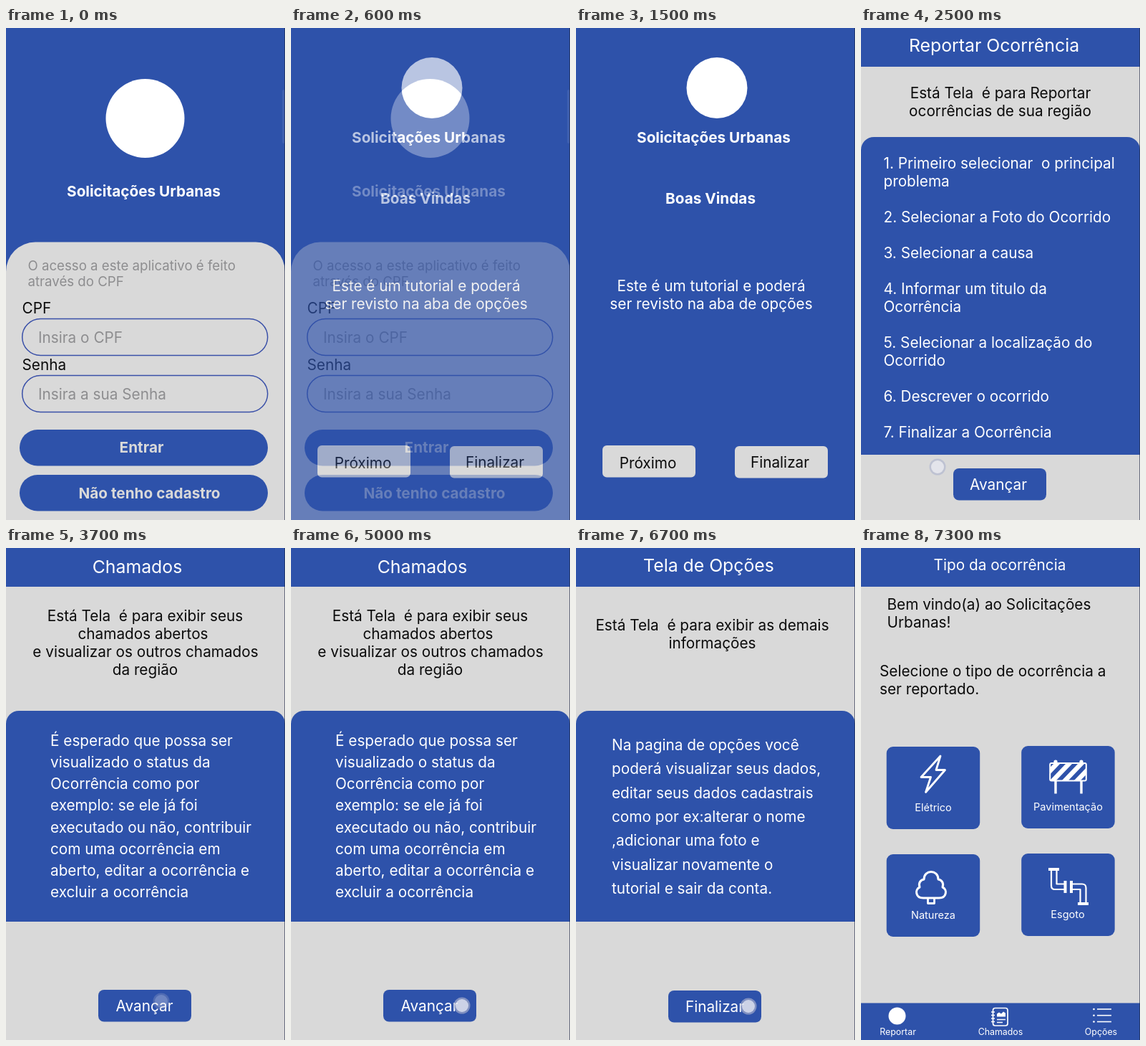
Recreate the animation shown at these times as an HTML page. Size 390 by 686 pixels, loop 8000 ms.

```html
<!DOCTYPE html>
<html lang="pt">
<head>
<meta charset="utf-8">
<title>Tutorial</title>
<style>
html, body { margin: 0; width: 100%; height: 100%; overflow: hidden; background: #2e52aa; }
svg { display: block; width: 100%; height: 100%; }
text { font-family: Inter, Roboto, sans-serif; white-space: pre; }
</style>
</head>
<body>
<svg id="stage" viewBox="0 0 390 686"></svg>
<script>
const BLUE = '#2e52aa', GREY = '#d9d9d9', WHITE = '#fff', INK = '#0b0b0b';
const HINT = '#8d8d8f';
const BODY = 20.75, HEAD = 24.8, NOTE = 18.65, LABEL = 14.5, TAB = 12.4;
const LOOP = 8000, STEP = 100;
const APP = 'Solicitações Urbanas';

// Shape and text helpers
const rect = (x, y, w, h, r, fill, extra = '') =>
  `<rect x="${x}" y="${y}" width="${w}" height="${h}" rx="${r}" fill="${fill}" ${extra}/>`;
const text = (x, y, s, fill, size = BODY, extra = '') =>
  `<text x="${x}" y="${y}" fill="${fill}" font-size="${size}" ${extra}>${s}</text>`;
const mid = (x, y, s, fill, size = BODY, weight = 400) =>
  text(x, y, s, fill, size, `text-anchor="middle" font-weight="${weight}"`);
const bold = (x, y, s, fill) => mid(x, y, s, fill, BODY, 700);
const lines = (x, y, gap, list, fill) =>
  list.map((s, i) => text(x, y + i * gap, s, fill)).join('');
const circle = (x, y, r, fill = WHITE) => `<circle cx="${x}" cy="${y}" r="${r}" fill="${fill}"/>`;
const line = (d, w) =>
  `<path d="${d}" fill="none" stroke="#fff" stroke-width="${w}" stroke-linejoin="round"/>`;

// Sheet with rounded top corners
const sheet = (top, bottom, r, fill) =>
  `<path d="M0 ${bottom}V${top + r}A${r} ${r} 0 0 1 ${r} ${top}H${390 - r}A${r} ${r} 0 0 1 390 ${top + r}V${bottom}Z" fill="${fill}"/>`;

const field = (y, label, hint) =>
  text(22.5, y - 7.5, label, INK) +
  rect(22.7, y, 343, 51, 25.5, 'none', 'stroke="#3a50a8" stroke-width="1.5"') +
  text(45, y + 33, hint, HINT);

const login = rect(0, 0, 390, 686, 0, BLUE) +
  circle(194.5, 126, 55) +
  bold(192.5, 235, APP, WHITE) +
  sheet(298.6, 686, 41, GREY) +
  text(30.5, 337.5, 'O acesso a este aplicativo é feito', HINT, NOTE) +
  text(30.5, 360, 'através do CPF', HINT, NOTE) +
  field(405.5, 'CPF', 'Insira o CPF') +
  field(484.5, 'Senha', 'Insira a sua Senha') +
  rect(19, 560, 347, 50.5, 25, BLUE) + bold(189.5, 592, 'Entrar', GREY) +
  rect(19, 623, 347, 50.5, 25, BLUE) + bold(200.5, 656, 'Não tenho cadastro', GREY);

const welcome = rect(0, 0, 390, 686, 0, BLUE) +
  circle(197, 83.5, 42.5) +
  bold(192.5, 160, APP, WHITE) +
  bold(188, 245, 'Boas Vindas', WHITE) +
  mid(189, 367, 'Este é um tutorial e poderá', WHITE) +
  mid(189, 392, 'ser revisto na aba de opções', WHITE) +
  rect(37, 582, 130, 44.5, 6, GREY) + mid(100.5, 613.5, 'Próximo', INK) +
  rect(222, 583, 130, 44.5, 6, GREY) + mid(285, 612.5, 'Finalizar', INK);

const page = (title, x, y, size = HEAD) =>
  rect(0, 0, 390, 686, 0, GREY) + rect(0, 0, 390, 54, 0, BLUE) + mid(x, y, title, WHITE, size);
const button = (y, x, label) =>
  rect(129, y, 130, 44.5, 8, BLUE) + mid(x, y + 29.5, label, WHITE);

const report = page('Reportar Ocorrência', 186, 33) +
  mid(195, 98, 'Está Tela  é para Reportar', INK) +
  mid(194.5, 123, 'ocorrências de sua região', INK) +
  sheet(152, 595, 18, BLUE) +
  lines(31.5, 196, 25, [
    '1. Primeiro selecionar  o principal', 'problema', '',
    '2. Selecionar a Foto do Ocorrido', '',
    '3. Selecionar a causa', '',
    '4. Informar um titulo da', 'Ocorrência', '',
    '5. Selecionar a localização do', 'Ocorrido', '',
    '6. Descrever o ocorrido', '',
    '7. Finalizar a Ocorrência'], WHITE) +
  button(614, 192, 'Avançar');

const calls = page('Chamados', 183.5, 35) +
  mid(194.5, 102, 'Está Tela  é para exibir seus', INK) +
  mid(191.5, 127, 'chamados abertos', INK) +
  mid(195, 152, 'e visualizar os outros chamados', INK) +
  mid(194.5, 177, 'da região', INK) +
  sheet(227, 521, 18, BLUE) +
  lines(62, 276, 30.15, [
    'É esperado que possa ser', 'visualizado o status da', 'Ocorrência como por',
    'exemplo: se ele já foi', 'executado ou não, contribuir', 'com uma ocorrência em',
    'aberto, editar a ocorrência e', 'excluir a ocorrência'], WHITE) +
  button(616, 193.5, 'Avançar');

const options = page('Tela de Opções', 185.5, 33) +
  mid(190.5, 114.5, 'Está Tela  é para exibir as demais', INK) +
  mid(190.5, 139.5, 'informações', INK) +
  sheet(227, 521, 18, BLUE) +
  lines(50, 282, 33.3, [
    'Na pagina de opções você', 'poderá visualizar seus dados,', 'editar seus dados cadastrais',
    'como por ex:alterar o nome', ',adicionar uma foto e', 'visualizar novamente o',
    'tutorial e sair da conta.'], WHITE) +
  button(617, 194, 'Finalizar');

// Icons
const bolt = line('M111 290L84 319.5H97.5L90.5 340.5L117.5 309.5H105Z', 2.8);

const stripes = [0, 1, 2, 3].map(i =>
  `<path d="M${246 + i * 17} 325l25 -26h9l-25 26z" fill="#fff"/>`).join('');
const barrier =
  `<clipPath id="board">${rect(264, 300, 51, 24.5, 2, WHITE)}</clipPath>` +
  `<g clip-path="url(#board)">${stripes}</g>` +
  rect(264.2, 300, 50.6, 24.5, 2, 'none', 'stroke="#fff" stroke-width="2"') +
  [272, 308].map(x => circle(x, 298, 2.6) + rect(x - 1.7, 325, 3.4, 17.5, 0, WHITE)).join('');

const tree =
  line('M87 488C76 488 75 476 82 473C80 467 83 463 88 462C88 455 93 451.5 98 451.5' +
    'C103 451.5 108 455 108 462C113 463 116 467 114 473C121 476 120 488 109 488Z', 3) +
  line('M93.5 488V495.5H102.5V488', 2.8);

const pipes =
  line('M262 448H277M285.5 464V481M294 464V481M303 496H318', 4) +
  line('M266 449V471Q266 476 271 476H284M273.5 449V468.5H284', 2.2) +
  line('M296 468.5H309Q314.5 468.5 314.5 474V495M296 476H306.5V495', 2.2);

const book =
  rect(184.5, 641.5, 20.5, 24.5, 3, 'none', 'stroke="#fff" stroke-width="1.7"') +
  line('M182 647h5M182 651.5h5M182 656h5M182 660.5h5', 1.5) +
  '<path d="M190 653.5v-4l3 -2 3 2 3 -3 3 2v5z" fill="#fff"/>' +
  line('M190 657.5H202M190 661.5H198', 1.6);

const list = [643, 651.7, 660.5].map(y =>
  circle(325.5, y, 1.3) + line(`M330 ${y}H350`, 1.6)).join('');

const card = (x, y, cx, label, icon) =>
  rect(x, y, 130.5, 115, 9, BLUE) + icon + mid(cx, y + 89.5, label, WHITE, LABEL);

const [appFirst, appLast] = APP.split(' ');
const home = page('Tipo da ocorrência', 194, 31, BODY) +
  lines(36.5, 86, 25, [`Bem vindo(a) ao ${appFirst}`, `${appLast}!`], INK) +
  lines(26, 179, 25, ['Selecione o tipo de ocorrência a', 'ser reportado.'], INK) +
  card(35.7, 277, 101, 'Elétrico', bolt) +
  card(224.2, 276, 289.5, 'Pavimentação', barrier) +
  card(35.7, 427, 101, 'Natureza', tree) +
  card(224.2, 426, 289, 'Esgoto', pipes) +
  rect(0, 634.5, 390, 52, 0, BLUE) +
  circle(50.5, 652.5, 12) + book + list +
  mid(51.5, 679, 'Reportar', WHITE, TAB) +
  mid(195, 679, 'Chamados', WHITE, TAB) +
  mid(335.5, 678.5, 'Opções', WHITE, TAB);

// Dissolves: [screen, start, duration, easing power]
const screens = [
  [login, -1, 1, 1],
  [welcome, 0, 900, 1],
  [report, 2350, 150, 2],
  [calls, 3530, 170, 2],
  [options, 5080, 300, 2],
  [home, 6780, 400, 2]
];
// Touches: [x, y, time]
const taps = [[107, 612, 2400], [217, 632, 3500], [239, 638, 5000], [241, 639, 6700]];

const stage = document.getElementById('stage');
stage.innerHTML =
  screens.map(s => `<g class="screen">${s[0]}</g>`).join('') +
  '<g id="touch">' + circle(0, 0, 11.5, 'rgba(172,178,206,.65)') +
  circle(0, 0, 9, 'rgba(255,255,255,.6)') + '</g>' +
  rect(386, 86, 4, 75, 2, WHITE, 'id="handle"') +
  rect(389.2, 0, 0.8, 686, 0, '#1c2440', 'opacity=".75"');

const layers = [...stage.querySelectorAll('.screen')];
const touch = document.getElementById('touch');
const handle = document.getElementById('handle');
const clamp = v => Math.max(0, Math.min(1, v));

function draw(now) {
  const t = Math.floor((now % LOOP) / STEP) * STEP;
  screens.forEach(([, start, span, power], i) => {
    const p = 1 - (1 - clamp((t - start) / span)) ** power;
    layers[i].setAttribute('opacity', p);
  });
  const tap = taps.filter(p => p[2] <= t).pop();
  if (tap) touch.setAttribute('transform', `translate(${tap[0]} ${tap[1]})`);
  touch.setAttribute('opacity', tap ? clamp((tap[2] + 280 - t) / 200) : 0);
  handle.setAttribute('opacity', 0.08 * clamp((1500 - t) / 500));
}

const origin = performance.now();
function tick() {
  draw(performance.now() - origin);
  requestAnimationFrame(tick);
}
tick();
</script>
</body>
</html>
```
